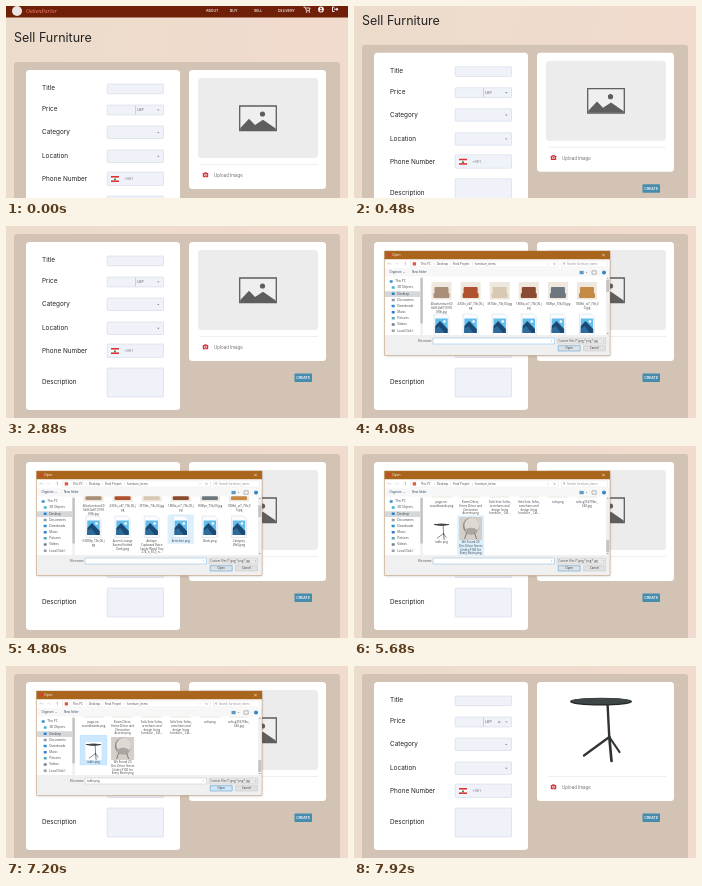
These frames come from a looping animation (342x192 px, 8000 ms). An HTML page with a canvas:

```html
<!DOCTYPE html>
<html lang="en">
<head>
<meta charset="utf-8">
<title>Sell Furniture</title>
<style>
html, body { margin: 0; width: 100%; height: 100%; overflow: hidden; background: #eedccd; }
canvas { display: block; width: 100vw; height: 100vh; }
</style>
</head>
<body>
<canvas id="stage"></canvas>
<script>
const W = 342, H = 192, LOOP = 8000, STEP = 80;
const canvas = document.getElementById('stage');
const c = canvas.getContext('2d');
const UI = 'Inter, sans-serif', SYS = '"Open Sans", sans-serif';

function resize() {
  const d = window.devicePixelRatio || 1;
  canvas.width = Math.round(innerWidth * d);
  canvas.height = Math.round(innerHeight * d);
}

function box(x, y, w, h, fill, r = 0, stroke, lw = 0.5) {
  c.beginPath();
  c.roundRect(x, y, w, h, r);
  if (fill) { c.fillStyle = fill; c.fill(); }
  if (stroke) { c.strokeStyle = stroke; c.lineWidth = lw; c.stroke(); }
}

function disc(x, y, rx, fill, ry = rx) {
  c.beginPath();
  c.ellipse(x, y, rx, ry, 0, 0, Math.PI * 2);
  c.fillStyle = fill;
  c.fill();
}

function poly(points, fill) {
  c.beginPath();
  points.forEach(([x, y]) => c.lineTo(x, y));
  c.fillStyle = fill;
  c.fill();
}

function line(points, color, lw = 0.5) {
  c.beginPath();
  points.forEach(([x, y]) => c.lineTo(x, y));
  c.strokeStyle = color;
  c.lineWidth = lw;
  c.stroke();
}

function text(s, x, y, size, color, font = UI, align = 'left', style = '') {
  c.font = `${style} ${size}px ${font}`;
  c.textAlign = align;
  c.textBaseline = 'middle';
  c.fillStyle = color;
  c.fillText(s, x, y);
}

const sys = (s, x, y, color = '#444', align = 'left', size = 2.9) =>
  text(s, x, y, size, color, SYS, align);
const caret = (x, y, color = '#888', s = 1.2) =>
  poly([[x - s, y - s / 2], [x + s, y - s / 2], [x, y + s * 0.7]], color);
const cross = (x, y, r, color, lw) => {
  line([[x - r, y - r], [x + r, y + r]], color, lw);
  line([[x + r, y - r], [x - r, y + r]], color, lw);
};

// Motion advances in fixed steps
function progress(t, start, steps) {
  const k = Math.floor((t - start) / STEP) + 1;
  return Math.max(0, Math.min(1, k / steps));
}
const easeOut = p => 1 - (1 - p) * (1 - p);
const within = (t, a, b) => t >= a && t < b;

function header() {
  box(0, -48, W, 11.5, '#701f08');
  disc(11, -43, 5, '#ece5e2');
  text('OakenParlor', 20, -42.5, 5.2, '#f27a68', '"Noto Serif", serif', 'left', 'italic');
  [['ABOUT', 200], ['BUY', 224], ['SELL', 248], ['DELIVERY', 272]].forEach(([s, x]) =>
    text(s, x, -42.8, 3.5, '#fff', UI, 'left', '500'));
  line([[297.5, -47], [299, -47], [300.4, -43.4], [303.4, -43.4], [304, -46], [299.5, -46]], '#fff', 0.8);
  disc(300.5, -42, 0.7, '#fff');
  disc(303.3, -42, 0.7, '#fff');
  disc(315, -44.5, 2.9, '#fff');
  disc(315, -45.5, 0.9, '#701f08');
  disc(315, -43.2, 1.6, '#701f08', 0.8);
  line([[328.5, -47], [326.5, -47], [326.5, -42.5], [328.5, -42.5]], '#fff', 0.9);
  line([[328, -44.8], [332, -44.8]], '#fff', 0.9);
  poly([[330.4, -46.6], [332.4, -44.8], [330.4, -43]], '#fff');
}

function form(t) {
  box(20, 16, 154, 168, '#fff', 3.5);
  const rows = [
    ['Title', 34.5, 30, 9.7], ['Price', 55.5, 51, 10], ['Category', 78, 72, 12.5],
    ['Location', 102, 96, 12.5], ['Phone Number', 125, 118, 13.5], ['Description', 156, 142, 29]
  ];
  rows.forEach(([name, mid, top, h]) => {
    text(name, 36, mid, 6.4, '#222');
    box(101.2, top, 56.3, h, '#eff2f9', 0.8, '#ccd1df');
  });
  line([[129.5, 51.5], [129.5, 60.5]], '#b5b9c5', 0.6);
  text('LBP', 131, 56.2, 3.7, '#6d6d72');
  if (t >= 7920) cross(145.3, 56, 1.1, '#777', 0.6);
  [56, 78.5, 102.3].forEach(y => caret(152.3, y));
  box(105, 122, 8, 6, '#fff');
  box(105, 122, 8, 1.6, '#df3038');
  box(105, 126.4, 8, 1.6, '#df3038');
  poly([[109, 123.5], [110.4, 126.3], [107.6, 126.3]], '#35904c');
  text('+961', 118, 125.2, 3.8, '#85858a');
}

function placeholder() {
  box(192, 24, 120, 80, '#ececec', 3.5);
  box(233.7, 52, 36.6, 24.5, '#efefef', 0, '#5e5e5e', 1.3);
  disc(256.5, 60, 2.6, '#5e5e5e');
  poly([[234.3, 74], [243, 64.7], [249, 71], [257, 65.7], [269.7, 74.5], [269.7, 76], [234.3, 76]], '#5e5e5e');
}

function table(x, y, s) {
  c.save();
  c.translate(x, y);
  c.scale(s, s);
  c.lineCap = 'round';
  const dark = '#303436';
  line([[6.5, 2], [8.3, 37]], dark, 2.4);
  line([[8.3, 36], [-17, 54.5]], dark, 2.3);
  line([[8.3, 36], [10.5, 60]], dark, 2.7);
  line([[8.3, 36], [18.5, 51]], dark, 2.2);
  disc(0, 0.8, 31, '#232729', 3.8);
  disc(0, 0, 30.7, '#404648', 3.2);
  c.restore();
}

function picture(t) {
  box(183, 16, 137, 119, '#fff', 3.5);
  if (t < 7760) placeholder();
  else table(247, 35, 1);
  line([[194, 110.5], [312, 110.5]], '#e4e4e4', 0.6);
  box(196.8, 119, 5.4, 4.2, '#cf343a', 0.6);
  box(198.3, 118.2, 2.4, 1.4, '#cf343a', 0.3);
  disc(199.5, 121.1, 1.3, '#fff');
  disc(199.5, 121.1, 0.75, '#cf343a');
  text('Upload Image', 208, 121.8, 4.4, '#6e6e6e');
}

function page(t) {
  const bg = c.createLinearGradient(0, 0, W, 40);
  bg.addColorStop(0, '#ecdccc');
  bg.addColorStop(1, '#f1dbce');
  box(0, 0, W, H, bg);
  c.save();
  c.translate(0, 48 - 48 * easeOut(progress(t, 400, 10)));
  header();
  text('Sell Furniture', 8, -15.8, 12.5, '#222');
  box(8, 8, 326, 260, '#d3c3b5', 3);
  form(t);
  picture(t);
  box(288.5, 147.5, 17.5, 8.5, '#458cad', 0.8);
  text('CREATE', 297.2, 152, 3.5, '#fff', UI, 'center', '600');
  c.restore();
}

const files = [
  { top: 0, names: ['40asfurniture60|0a9f-0a87-0918|0f9b.jpg', '4303x_v47_73b,00.j|pg', '3570bc_73b,00.jpg',
    '1808a_oi7_73b,00.j|pg', '1808pc_73b,00.jpg', '1808xl_oi7_73b,0|0.jpg'] },
  { top: 35, icon: true, names: ['63008p_73b,00.j|pg', 'Accent Lounge|Accent Knitted|Dark.jpeg',
    'Antique|Cupboard Retro|Candy Wood Tray|274_n_50,0_n...', 'Armchair.png', 'Book.jpeg', 'Category|Wall.jpeg'] },
  { top: 76, names: ['chair.png', 'Coffee table|oak.jpeg', 'Corner desk|white.jpg', 'Cupboard.png', 'desk.png', 'Dining set|brown.jpeg'] },
  { top: 116, names: ['page-no-|soundboards.png', 'Room Décor,|Home Décor and|Decorative|Accents.png',
    'Sofa Sets: Sofas,|armchairs and|design living|furniture _ Cat...', 'Sofa Sets: Sofas,|armchairs and|design living|furniture _ Cat...',
    'sofa.png', 'sofa-g37d7f3bc_|640.jpg'] },
  { top: 156, names: ['table.png', 'We Found 20|Chic Décor Stores|Under $100 for|Every Room.png'] }
];
const tones = ['#a98f78', '#b0512f', '#d8c9b4', '#8b4a32', '#6d7780', '#c58a45'];

function photoIcon(x, y) {
  const sheet = [[x - 7.5, y], [x + 4.5, y], [x + 7.5, y + 3], [x + 7.5, y + 21.5], [x - 7.5, y + 21.5]];
  poly(sheet, '#fafcff');
  line([...sheet, sheet[0]], '#c3ccd4', 0.4);
  box(x - 6.2, y + 4.5, 12.4, 14.5, '#63bdeb');
  poly([[x - 6.2, y + 12], [x - 1.5, y + 7], [x + 6.2, y + 15], [x + 6.2, y + 19], [x - 6.2, y + 19]], '#1a4a74');
  poly([[x - 6.2, y + 15], [x - 2.5, y + 12], [x + 3, y + 19], [x - 6.2, y + 19]], '#2c6b9c');
  disc(x + 3, y + 7.5, 1.3, '#fff');
}

function chair(x, y) {
  box(x - 11.5, y, 23, 23, '#d3d0cb');
  disc(x + 0.5, y + 9, 8.2, '#8f8c88', 8.6);
  disc(x + 1.2, y + 8.6, 7.4, '#dedad3', 7.8);
  disc(x + 0.5, y + 14, 6.2, '#aaa6a1', 3.2);
  line([[x - 4, y + 16], [x - 6, y + 22]], '#6b5440', 0.7);
  line([[x + 4, y + 16], [x + 6, y + 22]], '#6b5440', 0.7);
}

function roomThumb(x, y, tone) {
  box(x - 10, y + 3, 20, 17.5, '#eee8df');
  box(x - 7, y + 8, 14, 9, tone, 1);
  box(x - 8, y + 14, 16, 5, tone, 1);
}

// Highlighted cell: [row, column, selected]
function highlight(t) {
  if (within(t, 4800, 4960)) return [1, 3, false];
  if (within(t, 5680, 6080)) return [4, 1, false];
  if (t >= 6080) return [4, 0, t >= 6400];
  return [];
}

function fileList(t) {
  const scroll = 18 * progress(t, 4560, 4) + 62 * progress(t, 4960, 5) + 58 * progress(t, 5440, 4);
  c.save();
  c.beginPath();
  c.rect(70, 50.5, 182, 58.5);
  c.clip();
  const [markRow, markCol, selected] = highlight(t);
  files.forEach((row, r) => {
    const y = 53 + row.top - scroll;
    row.names.forEach((name, i) => {
      const x = 87.5 + i * 29.1, lines = name.split('|');
      if (r === markRow && i === markCol) {
        box(x - 13.3, y - 1.5, 26.6, 25.5 + lines.length * 3.7, selected ? '#cce8ff' : '#dceffd', 0,
          selected ? '#99d1ff' : null, 0.4);
      }
      if (r === 4 && i === 0) {
        box(x - 8, y + 5, 16, 18, '#fff');
        table(x, y + 7.5, 0.25);
      } else if (r === 4) chair(x, y);
      else if (row.icon) photoIcon(x, y);
      else roomThumb(x, y, tones[(i + r) % tones.length]);
      lines.forEach((s, k) => sys(s, x, y + 25.5 + k * 3.7, '#444', 'center'));
    });
  });
  c.restore();
  box(252, 50.5, 3.5, 58.5, '#f0f0f0');
  box(252.3, 54 + 40 * scroll / 138, 2.9, 12, '#c3c3c3');
  caret(253.8, 107.5, '#666', 0.8);
  poly([[253, 52.8], [254.6, 52.8], [253.8, 51.7]], '#666');
}

function sidebar() {
  const items = [['This PC', '#3a8fc4'], ['3D Objects', '#4db3d0'], ['Desktop', '#2685cc'], ['Documents', '#8a9aa6'],
    ['Downloads', '#2f8fd8'], ['Music', '#3b79cf'], ['Pictures', '#57a5b9'], ['Videos', '#6f7f8c'], ['Local Disk (', '#9aa0a4']];
  box(31, 65.3, 35, 5.7, '#d5d8da');
  items.forEach(([name, color], i) => {
    const y = 55.5 + i * 6.15, x = i ? 39 : 37;
    box(x - 1.3, y - 1.3, 3, 2.5, color, 0.4);
    sys(name, x + 4.2, y, '#444', 'left', 3.1);
  });
  box(66.3, 50.5, 2.6, 58.5, '#f0f0f0');
  box(66.4, 52, 2.4, 45.5, '#c2c2c2');
}

function dialog(t) {
  const px = canvas.width / W;
  c.save();
  c.shadowColor = 'rgba(0,0,0,.3)';
  c.shadowBlur = 3 * px;
  c.shadowOffsetY = 0.5 * px;
  box(30.5, 25, 225.5, 104.5, '#fff');
  c.restore();
  box(30.5, 25, 225.5, 8.2, '#aa651c');
  disc(35.2, 29, 1.8, '#d7402f');
  sys('Open', 38.3, 29.2, '#fff', 'left', 3.2);
  cross(249.5, 29, 1.3, '#fff', 0.5);

  line([[37.5, 37.8], [33.5, 37.8], [35, 36.4]], '#aaa', 0.4);
  line([[40.5, 37.8], [44.5, 37.8], [43, 36.4]], '#ccc', 0.4);
  line([[51.5, 39.5], [51.5, 36], [50.2, 37.4]], '#888', 0.4);
  box(56.5, 34.8, 148, 6.3, '#fff', 0, '#dcdcdc', 0.4);
  box(58.7, 36.2, 3.4, 3.2, '#dc5a42', 0.4);
  [['This PC', 67], ['Desktop', 83], ['Final Project', 99], ['furniture_items', 121]].forEach(([s, x], i) => {
    sys(s, x, 38);
    if (i) sys('›', x - 3, 37.9, '#777');
  });
  caret(194, 38, '#888', 0.7);
  sys('↻', 200.5, 38, '#777', 'center', 3.2);
  box(207.5, 34.8, 46, 6.3, '#fff', 0, '#dcdcdc', 0.4);
  sys('Search furniture_items', 213, 38, '#888');
  disc(210.2, 37.6, 1, '#888');
  disc(210.2, 37.6, 0.6, '#fff');

  box(30.7, 42.3, 225, 8.2, '#f7f7f7');
  sys('Organize', 35.5, 46.5, '#2c4668');
  caret(50, 46.6, '#555', 0.7);
  sys('New folder', 58, 46.5, '#2c4668');
  box(225.5, 44.9, 4.2, 3.3, '#599ac2');
  caret(232.5, 46.7, '#666', 0.7);
  box(238, 44.8, 4.2, 3.4, null, 0, '#777');
  disc(250, 46.5, 2, '#287fc0');
  sys('?', 250, 46.5, '#fff', 'center', 3);
  sidebar();
  fileList(t);

  box(30.7, 109, 225, 20.3, '#f0f0f0');
  sys('File name:', 64, 115);
  box(79, 112, 121.5, 6, '#fff', 0, t < 6400 ? '#7fb5e0' : '#b8c0c8', 0.5);
  if (t >= 6400) sys('table.png', 81, 115);
  caret(197.5, 115, '#777', 0.7);
  box(203.2, 112, 48.5, 6, '#e9e9e9', 0, '#bdbdbd', 0.4);
  sys('Custom Files (*.jpeg;*.png;*.jpg', 204.5, 115, '#444', 'left', 2.7);
  caret(249.6, 115, '#777', 0.7);
  box(204.2, 119.7, 22, 5.3, within(t, 7040, 7520) ? '#cfe6f7' : '#dde2e6', 0, '#5f9fd0', 0.6);
  sys('Open', 215.2, 122.4, '#333', 'center');
  box(229.5, 119.7, 22, 5.3, '#e1e1e1', 0, '#b8b8b8', 0.4);
  sys('Cancel', 240.5, 122.4, '#333', 'center');
  box(30.5, 25, 225.5, 104.5, null, 0, '#a97841', 0.4);
}

let start;
function frame(now) {
  start ??= now;
  const t = (now - start) % LOOP;
  c.setTransform(canvas.width / W, 0, 0, canvas.height / H, 0, 0);
  page(t);
  if (within(t, 4080, 7520)) dialog(t);
  requestAnimationFrame(frame);
}

addEventListener('resize', resize);
resize();
requestAnimationFrame(frame);
</script>
</body>
</html>
```
